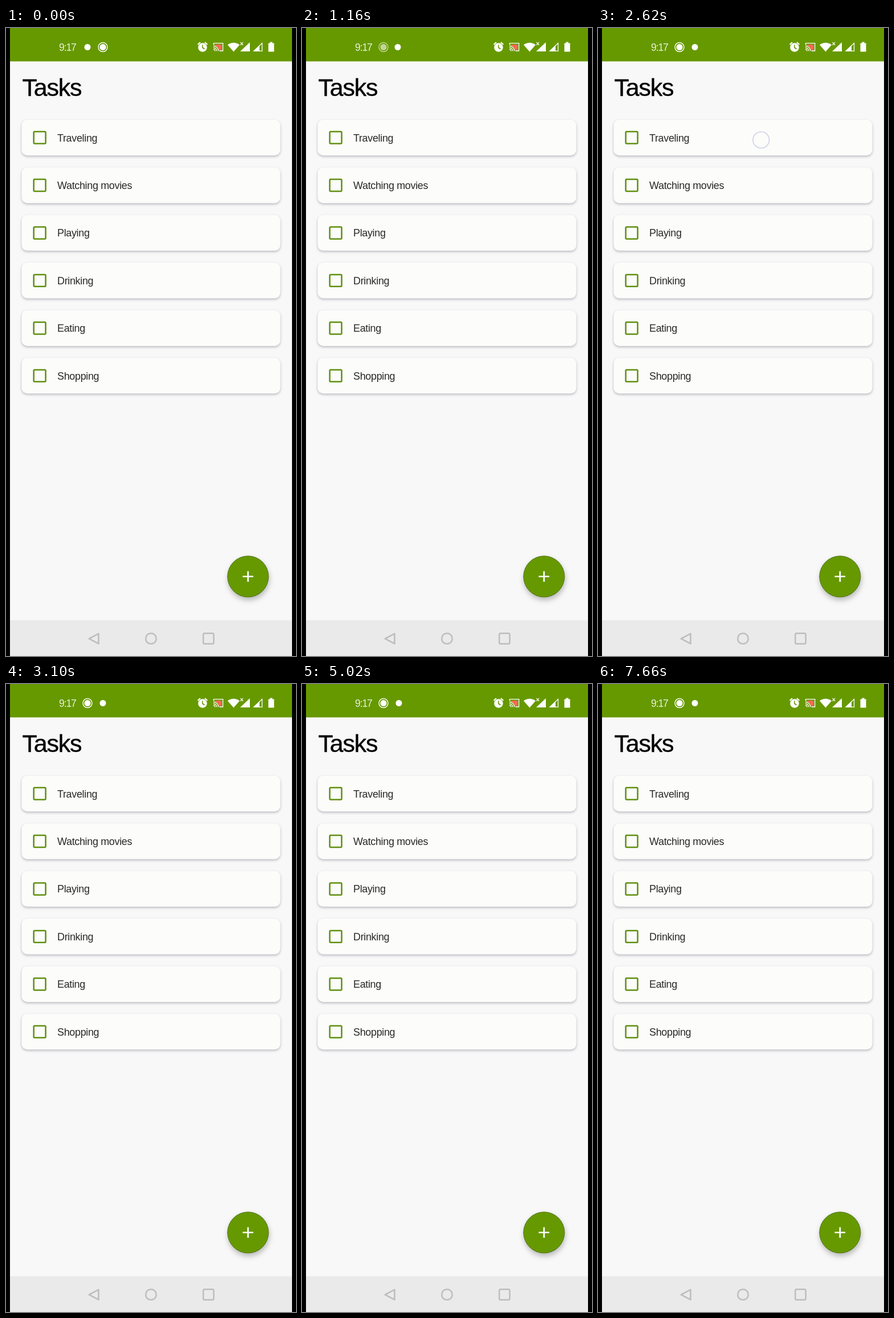
An HTML page that plays this animation: 509 px wide and 1100 px high, repeating every 8 s.

```html
<!DOCTYPE html>
<html lang="en">
<head>
<meta charset="utf-8">
<title>Tasks</title>
<style>
  html, body { margin: 0; width: 100%; height: 100%; overflow: hidden; background: #000; }
  svg { display: block; width: 509px; height: 1100px; }
  text { font-family: "Liberation Sans", Arial, sans-serif; }

  .title { font-size: 43px; letter-spacing: -1.2px; fill: #050505; stroke: #050505; stroke-width: .4px; }
  .label { font-size: 18px; letter-spacing: -.35px; fill: #282828; }
  .clock { font-size: 17.5px; letter-spacing: -1.1px; fill: #e9f1da; }
  .card { fill: #fcfcfb; filter: drop-shadow(0 2px 2px rgba(40, 40, 65, .3)); }
  .fab { fill: #690; stroke: #3f6100; stroke-width: .8px; filter: drop-shadow(1px 5px 5px rgba(0, 0, 0, .26)); }
  .nav { fill: none; stroke: #bdbdbd; stroke-width: 2.5px; stroke-linejoin: round; }

  .ring, .dot, .touch { animation: 8s linear infinite; }
  .ring { animation-name: ring; }
  .dot { animation-name: dot; }
  .touch { animation-name: touch; }

  /* The two notification icons swap places. */
  @keyframes ring {
    0%, 6.75% { transform: translateX(27px); }
    7% { transform: translateX(25px); }
    7.25% { transform: translateX(18px); }
    7.5% { transform: translateX(8px); }
    7.75%, 100% { transform: none; }
    0%, 9.5% { opacity: 1; }
    10.75%, 13.25% { opacity: 0; }
    14.5% { opacity: .6; }
    16%, 100% { opacity: 1; }
  }
  @keyframes dot {
    0%, 12% { transform: none; }
    13.25% { transform: translateX(17px); }
    14.5% { transform: translateX(25px); }
    16%, 100% { transform: translateX(27px); }
    0%, 6.98% { opacity: 1; }
    6.99%, 9.5% { opacity: 0; }
    10.75%, 100% { opacity: 1; }
  }

  /* A tap appears at once, drifts a little and fades. */
  @keyframes touch {
    0%, 27.98% { opacity: 0; }
    27.99%, 36.5% { opacity: 1; }
    38.75%, 100% { opacity: 0; }
    0%, 32.75% { transform: none; }
    37.5%, 100% { transform: translate(-3px, 5px); }
  }
</style>
</head>
<body>
<svg viewBox="0 0 509 1100">
  <defs>
    <g id="row">
      <rect class="card" x="27.5" width="454" height="62.5" rx="10"/>
      <rect x="48.7" y="20.9" width="20.9" height="20.9" rx="1.5" fill="none" stroke="#5f9010" stroke-width="2.5"/>
    </g>
  </defs>

  <rect width="509" height="1100" fill="#000"/>
  <rect x="7" width="495" height="1100" fill="#f8f8f8"/>
  <rect x="7" width="495" height="58.5" fill="#690"/>
  <rect x="7" y="1037.5" width="495" height="62.5" fill="#eaeaea"/>

  <!-- Status bar -->
  <text class="clock" x="93" y="39.5">9:17</text>
  <circle class="dot" cx="143" cy="33.5" r="5.5" fill="#fff"/>
  <g class="ring">
    <circle cx="143" cy="33.5" r="8" fill="none" stroke="#fff" stroke-width="1.4"/>
    <circle cx="143" cy="33.5" r="5.6" fill="#fff"/>
  </g>

  <!-- Alarm -->
  <circle cx="345" cy="34" r="7.8" fill="#fff"/>
  <path d="M336.5 29l4.5-4M353.5 29l-4.5-4" stroke="#fff" stroke-width="2"/>
  <path d="M345 29.5v5l3.5 2.2" fill="none" stroke="#690" stroke-width="1.6"/>

  <!-- Screen cast -->
  <path d="M367 29h11.5v9.500h-5a9 9 0 0 0-6.500-7Z" fill="#f66c50"/>
  <path d="M364.500 30v-3.300h16.200v13.300h-6M364 31.500a9 9 0 0 1 9 9M364 34.500a6 6 0 0 1 6 6M364 37.500a3 3 0 0 1 3 3" fill="none" stroke="#fff" stroke-width="1.3"/>

  <!-- Wi-Fi, signal and battery -->
  <g fill="#fff">
    <path d="M389 29.5Q399.500 22 410 29.500L399.500 41.500Z"/>
    <path d="M428 25v16h-17Z"/>
    <path d="M445 30.500v10.500h-11Z"/>
    <path d="M460.500 26.500h3v-2h4v2h3v15h-10Z"/>
  </g>
  <path d="M449.500 26.500v13.800h-14.500Z" fill="none" stroke="#fff" stroke-width="1.3"/>
  <path d="M411.500 25l4.500 5M416 25l-4.500 5" stroke="#fff" stroke-width="1.2"/>

  <!-- Task list -->
  <text class="title" x="28.5" y="119.2">Tasks</text>
  <use href="#row" y="160.7"/>
  <use href="#row" y="244.2"/>
  <use href="#row" y="327.6"/>
  <use href="#row" y="411"/>
  <use href="#row" y="494.4"/>
  <use href="#row" y="577.8"/>
  <g class="label">
    <text x="90" y="198.5">Traveling</text>
    <text x="90" y="282">Watching movies</text>
    <text x="90" y="365.4">Playing</text>
    <text x="90" y="448.8">Drinking</text>
    <text x="90" y="532.2">Eating</text>
    <text x="90" y="615.6">Shopping</text>
  </g>
  <circle class="touch" cx="286.3" cy="196" r="14.3" fill="none" stroke="#cfd1e4" stroke-width="1.6"/>

  <!-- Add button -->
  <circle class="fab" cx="424.8" cy="960.8" r="36"/>
  <path d="M415.5 960.8h18.6M424.8 951.5v18.6" stroke="#fff" stroke-width="2.6"/>

  <!-- Navigation -->
  <g class="nav">
    <path d="M162.5 1060.8v17.6l-16.8-8.8Z"/>
    <circle cx="254.5" cy="1069.5" r="9.3"/>
    <rect x="346.2" y="1060.3" width="18.4" height="18.4" rx="2.5"/>
  </g>
</svg>
</body>
</html>
```
